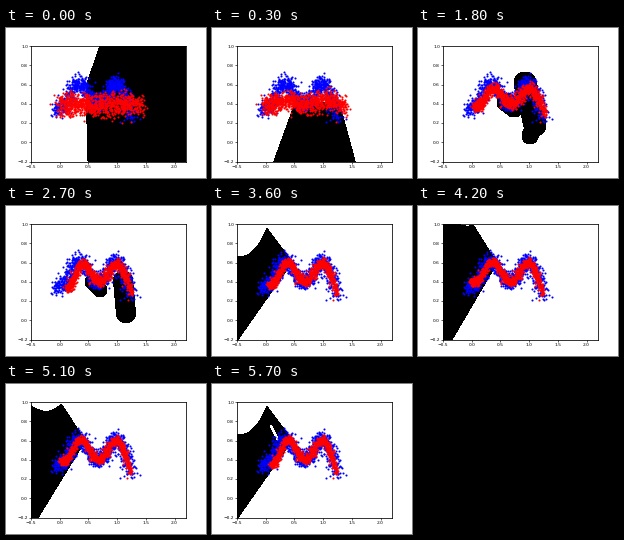
Animation, 200 px wide and 150 px high, one loop 6000 ms. Source, as a matplotlib script:

```python
import numpy as np
import matplotlib.pyplot as plt
from matplotlib.animation import FuncAnimation

FRAMES, STEP = 20, 300
N = 1000

fig = plt.figure(figsize=(6.4, 4.8), dpi=31.25, facecolor="white")
ax = fig.add_axes([0.125, 0.11, 0.775, 0.77])
ax.set(xlim=(-0.5, 2.2), ylim=(-0.2, 1.0),
       xticks=np.arange(-0.5, 2.1, 0.5), yticks=np.arange(-0.2, 1.1, 0.2))
ax.tick_params(width=1.4)
for spine in ax.spines.values():
    spine.set_linewidth(1.8)


def to_data(x, y):
    """Stage pixels (y down) to axes units."""
    return (x - 25) / 155 * 2.7 - 0.5, 1 - (y - 18) / 115.5 * 1.2


gx, gy = np.meshgrid(np.linspace(25, 180, 311), np.linspace(18, 133.5, 232))
grid = to_data(gx, gy)


# Region fields are positive inside, negative outside.
def side(x0, y0, x1, y1):
    """Half-plane to the right of the walk from one point to the other."""
    dx, dy = x1 - x0, y1 - y0
    return (dx * (gy - y0) - dy * (gx - x0)) / np.hypot(dx, dy)


def capsule(x0, y0, x1, y1, r):
    dx, dy = x1 - x0, y1 - y0
    k = np.clip(((gx - x0) * dx + (gy - y0) * dy) / (dx**2 + dy**2), 0, 1)
    return r - np.hypot(gx - x0 - k * dx, gy - y0 - k * dy)


def both(*fields):
    return np.minimum.reduce(fields)


def either(*fields):
    return np.maximum.reduce(fields)


def horn():
    """Area on the left, rising to a sharp tip."""
    rise = gy - 51 + 29 * ((gx - 25) / 30)**2.5
    return both(rise, side(54, 21, 72, 45), side(69, 72, 25, 135))


# Area accepted by the discriminator at key steps
REGIONS = {
    0: both(side(82, 133, 80, 58), side(80, 58, 94, 18)),
    1: both(side(62, 133, 82, 78), side(130, 85, 143, 133), gy - 74),
    3: either(both(side(25, 130, 56, 75), side(66, 77, 57, 133), gy - 66),
              capsule(84, 77, 91, 80, 9)),
    6: either(capsule(107, 55, 117, 97, 11), capsule(116, 97, 112, 108, 8),
              capsule(88, 74, 96, 80, 9)),
    9: either(capsule(117, 75, 120, 107, 9.5), capsule(86, 76, 94, 84, 7)),
    12: horn(),
    15: both(side(56, 18, 75, 52), side(75, 64, 38, 133)),
    19: both(horn(), -capsule(59, 42, 66, 56, 2)),
}


def region_field(frame):
    lo = max(k for k in REGIONS if k <= frame)
    hi = min(k for k in REGIONS if k >= frame)
    u = (frame - lo) / max(hi - lo, 1)
    return REGIONS[lo] * (1 - u) + REGIONS[hi] * u


def wave(t, left, right, base, amp, drop_l, drop_r):
    """Two-humped curve with drooping ends, t in 0..1."""
    x = 50 + 75 * t + (left - 50) * (1 - t)**3 + (right - 125) * t**3
    u = 2 * t - 1
    drop = np.where(u < 0, drop_l, drop_r) * u**6
    y = base - amp * np.cos(2 * np.pi * (t - 0.307) * 2) + drop
    return np.column_stack([x, y])


def fake_points(frame):
    """Generated samples settle onto the real curve while swaying."""
    rest = np.exp(-frame / 4)
    fit = 1 - rest
    left = 57 - 4.5 * np.sin(2 * np.pi * frame / 12)
    centre = wave(latent, left, 124 + 9 * rest, 65.5 + 11 * rest,
                  10.5 * fit, (left - 52) * fit, 16 * fit)
    return centre + noise * (1.8 + 3.9 * rest)


rng = np.random.default_rng(4)
real = wave(rng.random(N), 50, 125, 65.5, 11, 9, 17)
real += rng.normal(0, 3.8, (N, 2))
latent = rng.random(N)
noise = rng.normal(0, 1, (N, 2))

dots = dict(ls="", marker="o", ms=4.8, mew=0)
ax.plot(*to_data(*real.T), color="blue", zorder=2, **dots)
fake, = ax.plot([], [], color="red", zorder=2.1, **dots)
region = None


def draw(frame):
    global region
    if region is not None:
        region.remove()
        region = None
    field = region_field(frame)
    if field.max() > 0:
        region = ax.contourf(*grid, field, levels=[0, 1000],
                             colors=["black"], zorder=1)
    fake.set_data(*to_data(*fake_points(frame).T))
    return [fake]


anim = FuncAnimation(fig, draw, frames=FRAMES, init_func=lambda: draw(0),
                     interval=STEP, repeat=True, repeat_delay=0)
plt.show()
```
